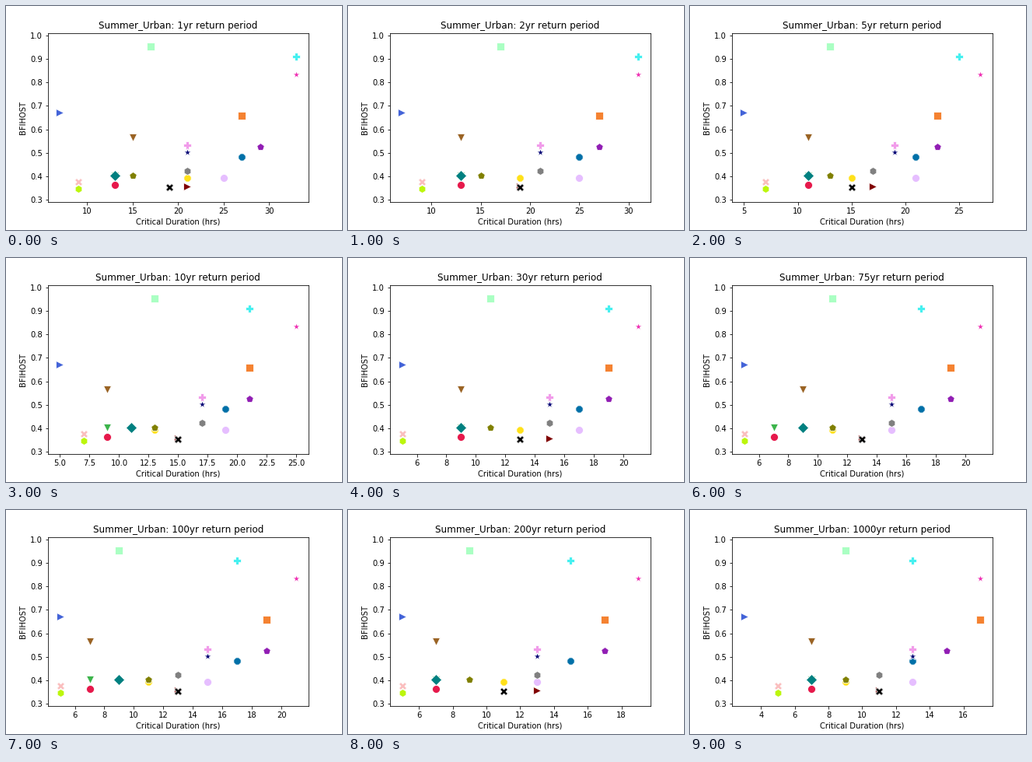
Write a matplotlib script that moves like this. It is 432x288 px and loops after 10 s.

```python
from itertools import cycle
import matplotlib.pyplot as plt
import numpy as np
from matplotlib.animation import FuncAnimation

PERIODS = (1, 2, 5, 10, 30, 50, 75, 100, 200, 1000)
MARKERS = "ov8>spP*hXD"

# colour, BFIHOST, duration at the shortest and the longest return period
SITES = [
    ("#e6194b", 0.365, 13.4, 6.0),
    ("#3cb44b", 0.405, 13.4, 6.0),
    ("#ffe119", 0.395, 20.0, 9.0),
    ("#4363d8", 0.672, 6.9, 3.8),
    ("#f58231", 0.660, 27.9, 16.1),
    ("#911eb4", 0.526, 28.0, 15.9),
    ("#46f0f0", 0.911, 32.9, 12.9),
    ("#f032b4", 0.834, 33.0, 17.0),
    ("#bcf60c", 0.348, 9.2, 4.2),
    ("#fabebe", 0.377, 9.2, 4.2),
    ("#008080", 0.402, 13.9, 7.0),
    ("#e6beff", 0.395, 25.95, 12.2),
    ("#9a6324", 0.567, 14.3, 6.3),
    ("#0070a8", 0.483, 27.0, 13.5),
    ("#800000", 0.356, 20.8, 11.9),
    ("#aaffc3", 0.952, 17.5, 8.1),
    ("#808000", 0.403, 15.9, 9.0),
    ("#f19cea", 0.533, 21.9, 13.0),
    ("#000075", 0.504, 21.9, 13.0),
    ("#808080", 0.423, 21.9, 11.9),
    ("#000000", 0.353, 19.7, 10.8),
]

plt.rcParams["text.kerning_factor"] = 6
fig, ax = plt.subplots(figsize=(6, 4), dpi=72)
fig.subplots_adjust(left=0.125, right=0.9, bottom=0.125, top=0.88)


def decay(step):
    """Share of the total fall in duration that is still to come."""
    return np.interp(step, (0, 1, 2, 3, 4, 7, 9),
                     (1, 0.9, 0.57, 0.45, 0.29, 0.2, 0))


def to_odd(hours):
    return 2 * int(hours // 2) + 1


def draw(step):
    ax.clear()
    left = decay(step)
    hours = [to_odd(last + (first - last) * left)
             for _, _, first, last in SITES]
    for x, (color, y, *_), marker in zip(hours, SITES, cycle(MARKERS)):
        ax.scatter(x, y, s=100, c=color, marker=marker,
                   edgecolors="white", linewidths=0.8)
    # the limits leave room for half a marker plus the usual margin
    low, high = min(hours) - 0.0173, max(hours) + 0.0173
    pad = 0.05 * (high - low)
    ax.set_xlim(low - pad, high + pad)
    ax.set_ylim(0.2907, 1.0111)
    ax.set_xlabel("Critical Duration (hrs)")
    ax.set_ylabel("BFIHOST")
    ax.set_title(f"Summer_Urban: {PERIODS[step]}yr return period")
    return []


anim = FuncAnimation(fig, draw, frames=len(PERIODS), interval=1000,
                     init_func=lambda: draw(0), repeat=True)
plt.show()
```
